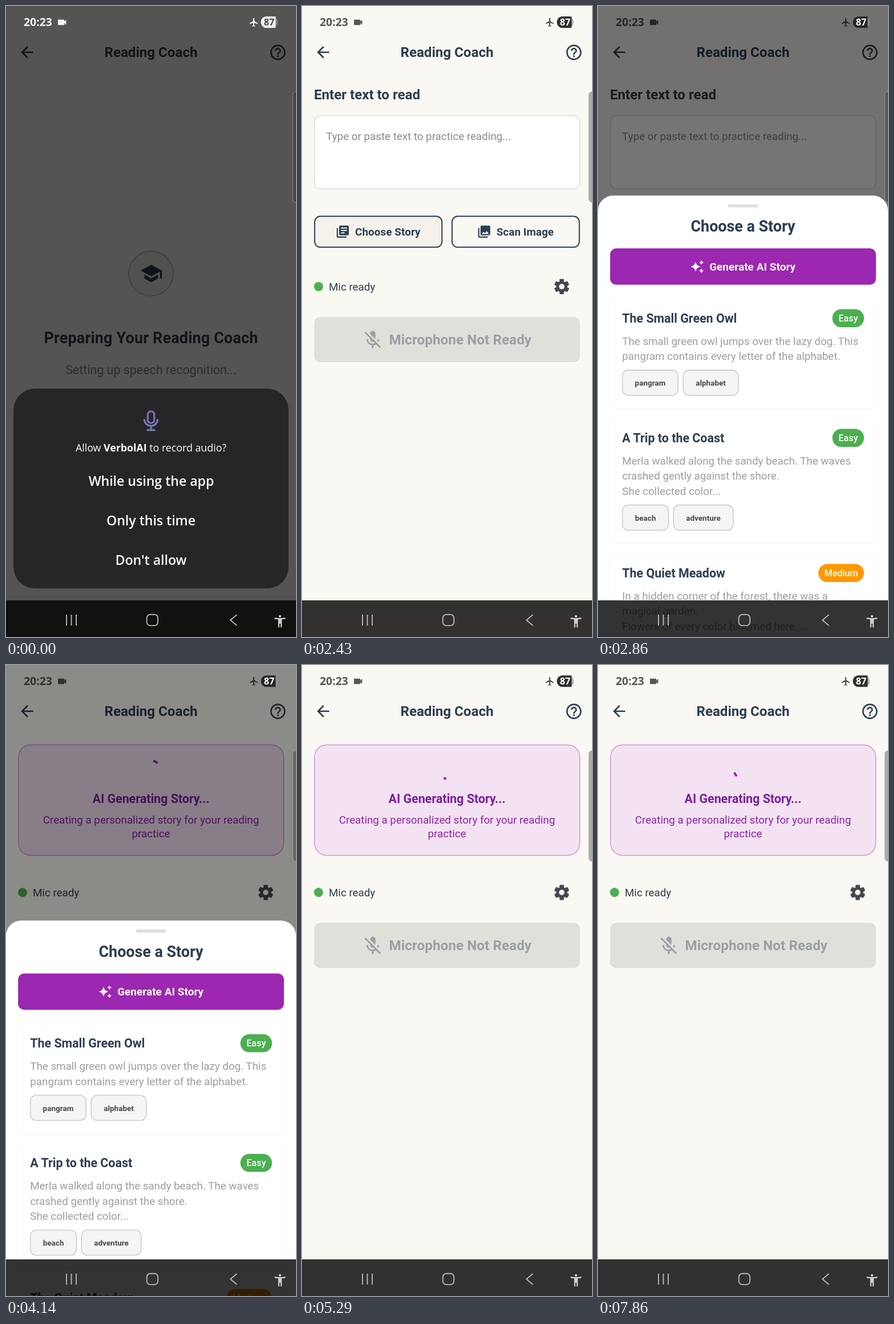
Recreate the animation shown at these times as an HTML page. Size 508 by 1102 pixels, loop 8 s.

```html
<!DOCTYPE html>
<html lang="en">
<head>
<meta charset="utf-8">
<title>Reading practice</title>
<style>
html, body { margin: 0; width: 100%; height: 100%; overflow: hidden; background: #f9f8f2; }
svg { display: block; font-family: Roboto, sans-serif; }
text { white-space: pre; }
.mid { text-anchor: middle; }
.bold { font-weight: 600; }
.navy { fill: #2c3e50; }
.s10 { font-size: 13.4px; letter-spacing: .06px; }
.s12 { font-size: 16.1px; }
.s14 { font-size: 18.76px; }
.s16 { font-size: 21.42px; }
.s18 { font-size: 24.1px; }
.s20 { font-size: 26.85px; }
.label { letter-spacing: .13px; }
.grey { fill: #9e9e9e; }
.card { fill: #fff; filter: drop-shadow(0 1px 2px rgba(0,0,0,.045)); }
.chip { fill: #f5f5f5; stroke: #c8c8cc; stroke-width: 1.4; }
.chipText { fill: #49454f; }
.outline { fill: #f9f8f2; stroke: #2c3e50; stroke-width: 2; }
.outline.pressed { fill: #f5f2eb; }
.system { font-family: "Open Sans", "Noto Sans", sans-serif; }
.choice { font-size: 23.1px; font-weight: 600; }
#status { --ink: rgba(0,0,0,.65); --pill: rgba(0,0,0,.73); --digits: #fff; }
#status.light { --ink: #f4f4f4; --pill: #f0f0f0; --digits: #4a4a48; }
</style>
</head>
<body>
<svg width="508" height="1102" viewBox="0 0 508 1102">
  <defs>
    <linearGradient id="violet" gradientUnits="userSpaceOnUse" x1="254" y1="706" x2="254" y2="742">
      <stop offset="0" stop-color="#8b69b4"/><stop offset="1" stop-color="#6c7cb9"/>
    </linearGradient>
    <rect id="tooth" x="-3.8" y="-13.2" width="7.6" height="7" rx="1.2"/>
  </defs>
  <rect width="508" height="1102" fill="#f9f8f2"/>

  <!-- App bar -->
  <g class="navy">
    <path transform="translate(20.9 64.7) scale(1.34)" d="M20 11H7.83l5.59-5.59L12 4l-8 8 8 8 1.41-1.41L7.83 13H20v-2z"/>
    <text class="mid bold s18" x="254" y="89.3">Reading Coach</text>
    <path transform="translate(460.2 64.9) scale(1.34)" d="M11 18h2v-2h-2v2zm1-16C6.48 2 2 6.48 2 12s4.48 10 10 10 10-4.48 10-10S17.52 2 12 2zm0 18c-4.41 0-8-3.59-8-8s3.59-8 8-8 8 3.59 8 8-3.59 8-8 8zm0-14c-2.21 0-4 1.79-4 4h2c0-1.1.9-2 2-2s2 .9 2 2c0 2-3 1.75-3 5h2c0-2.25 3-2.5 3-5 0-2.21-1.79-4-4-4z"/>
  </g>

  <g id="preparing" class="navy">
    <circle cx="254" cy="467.3" r="39" fill="#eeeee8" stroke="#bfc0bd" stroke-width="2"/>
    <path transform="translate(234 446.8) scale(1.7)" d="M5 13.18v4L12 21l7-3.82v-4L12 17l-7-3.82zM12 3L1 9l11 6 9-4.91V17h2V9L12 3z"/>
    <text class="mid bold s20" x="254" y="589.4" letter-spacing=".22">Preparing Your Reading Coach</text>
    <text class="mid s16" x="254" y="642.5" fill="#7b8288" style="fill:#7b8288">Setting up speech recognition...</text>
  </g>

  <g id="editor">
    <text class="bold s18 navy" x="21" y="162.6">Enter text to read</text>
    <rect x="22" y="191.5" width="464.5" height="127.7" rx="10.5" fill="#fff" stroke="#e3e3de" stroke-width="2"/>
    <text class="s14" x="42.3" y="234.4" fill="#8a8a8a">Type or paste text to practice reading...</text>
    <rect id="choose" class="outline" x="22.2" y="367.3" width="223" height="54" rx="10"/>
    <rect class="outline" x="262.8" y="367.3" width="223" height="54" rx="10"/>
    <g class="navy bold s14 label">
      <path transform="translate(58.7 381.4) scale(1.06)" d="M4 6H2v14c0 1.1.9 2 2 2h14v-2H4V6zm16-4H8c-1.1 0-2 .9-2 2v12c0 1.1.9 2 2 2h12c1.1 0 2-.9 2-2V4c0-1.1-.9-2-2-2zm-1 9H9V9h10v2zm-4 4H9v-2h6v2zm4-8H9V5h10v2z"/>
      <text x="93" y="401">Choose Story</text>
      <path transform="translate(306.4 381.4) scale(1.06)" d="M22 16V4c0-1.1-.9-2-2-2H8c-1.1 0-2 .9-2 2v12c0 1.1.9 2 2 2h12c1.1 0 2-.9 2-2zm-11-4l2.03 2.71L16 11l4 5H8l3-4zM2 6v14c0 1.1.9 2 2 2h14v-2H4V6H2z"/>
      <text x="340.7" y="401">Scan Image</text>
    </g>
  </g>

  <g id="generating">
    <rect x="22" y="139.5" width="464.5" height="193" rx="21" fill="#f3e2f2" stroke="#ce93d8" stroke-width="1.4"/>
    <path id="spinner" fill="none" stroke="#9c27b0" stroke-width="4" stroke-linecap="square"/>
    <text class="mid bold s16" x="254" y="241" fill="#7b1fa2">AI Generating Story...</text>
    <g class="mid s14" fill="#8e24aa">
      <text x="254" y="276.6">Creating a personalized story for your reading</text>
      <text x="254" y="300.6">practice</text>
    </g>
  </g>

  <g id="micRow">
    <circle cx="29" cy="490" r="8" fill="#4caf50"/>
    <text class="s14 navy" x="47" y="496.7">Mic ready</text>
    <g transform="translate(455 490)" fill="#444850">
      <circle r="7.3" fill="none" stroke="#444850" stroke-width="5"/>
      <use href="#tooth"/><use href="#tooth" transform="rotate(60)"/><use href="#tooth" transform="rotate(120)"/>
      <use href="#tooth" transform="rotate(180)"/><use href="#tooth" transform="rotate(240)"/><use href="#tooth" transform="rotate(300)"/>
    </g>
    <rect x="21.2" y="543" width="465.7" height="79" rx="10.5" fill="#dfe0da"/>
    <g fill="#9b9fa6">
      <path transform="translate(104.9 564.2) scale(1.59)" d="M19 11h-1.7c0 .74-.16 1.43-.43 2.05l1.23 1.23c.56-.98.9-2.09.9-3.28zm-4.02.17c0-.06.02-.11.02-.17V5c0-1.66-1.34-3-3-3S9 3.34 9 5v.18l5.98 5.99zM4.27 3L3 4.27l6.01 6.01V11c0 1.66 1.33 3 2.99 3 .22 0 .44-.03.65-.08l1.66 1.66c-.71.33-1.5.52-2.31.52-2.76 0-5.3-2.1-5.3-5.1H5c0 3.41 2.72 6.23 6 6.72V21h2v-3.28c.91-.13 1.77-.45 2.54-.9L19.73 21 21 19.73 4.27 3z"/>
      <text class="bold s18" x="152.6" y="591.2" letter-spacing=".12">Microphone Not Ready</text>
    </g>
  </g>

  <rect id="barrier" width="508" height="1102"/>

  <g id="sheet">
    <path d="M0 1110V357.5a26.5 26.5 0 0 1 26.5-26.5h455a26.5 26.5 0 0 1 26.5 26.5V1110z" fill="#fff"/>
    <rect x="227.5" y="346.5" width="53" height="5.3" rx="2.65" fill="#dfdfdf"/>
    <text class="mid bold s20 navy" x="254" y="394.3">Choose a Story</text>
    <rect x="21.2" y="423.3" width="465.7" height="63.5" rx="10.5" fill="#9c27b0"/>
    <g fill="#fff">
      <path transform="translate(161.6 442.8) scale(1.03)" d="M19 9l1.25-2.75L23 5l-2.75-1.25L19 1l-1.25 2.75L15 5l2.75 1.25L19 9zm-7.5.5L9 4 6.5 9.5 1 12l5.5 2.5L9 20l2.5-5.5L17 12l-5.5-2.5zM19 15l-1.25 2.75L15 19l2.75 1.25L19 23l1.25-2.75L23 19l-2.75-1.25L19 15z"/>
      <text class="bold s14 label" x="195.2" y="461.6">Generate AI Story</text>
    </g>
    <g id="stories"></g>
  </g>

  <rect y="1038" width="508" height="64" fill="#000" opacity=".8"/>
  <rect id="dim" width="508" height="1102"/>

  <g id="dialog" class="system" fill="#fafafa">
    <rect x="13.2" y="668.3" width="481.6" height="348.7" rx="37" fill="#262628"/>
    <g fill="none" stroke="url(#violet)" stroke-width="3.2">
      <rect x="248.3" y="707.8" width="11.4" height="20.6" rx="5.7"/>
      <path d="M242.3 721.5a11.7 11.9 0 0 0 23.4 0M254 733v7M246.5 740.7h15"/>
    </g>
    <text class="mid" x="254" y="778.4" font-size="17.8">Allow <tspan font-weight="700">VerbolAI</tspan> to record audio?</text>
    <g class="mid choice">
      <text x="254.5" y="838">While using the app</text>
      <text x="254" y="907">Only this time</text>
      <text x="254" y="975.6">Don't allow</text>
    </g>
  </g>

  <!-- Edge panel handle -->
  <rect x="502.5" y="149.5" width="20" height="193.5" rx="6" fill="rgba(45,45,45,.38)" stroke="rgba(165,165,165,.75)"/>

  <g id="status" class="system" font-weight="700">
    <g fill="var(--ink)">
      <text x="31" y="35.2" font-size="19.4">20:23</text>
      <path transform="translate(88.6 18.9) scale(.8)" d="M17 10.5V7c0-.55-.45-1-1-1H4c-.55 0-1 .45-1 1v10c0 .55.45 1 1 1h12c.55 0 1-.45 1-1v-3.5l4 4v-11l-4 4z"/>
      <path transform="translate(425.3 19.4) scale(.75)" d="M21 16v-2l-8-5V3.5c0-.83-.67-1.5-1.5-1.5S10 2.67 10 3.5V9l-8 5v2l8-2.5V19l-2 1.5V22l3.5-1 3.5 1v-1.5L13 19v-5.5l8 2.5z"/>
    </g>
    <rect x="446.5" y="18.3" width="29.5" height="20" rx="9.5" fill="#999" opacity=".7"/>
    <path d="M456 18.3h16.3v20H456a9.5 9.5 0 0 1-9.5-9.5v-1a9.5 9.5 0 0 1 9.5-9.5z" fill="var(--pill)"/>
    <text class="mid" x="461" y="34.2" font-size="16.2" fill="var(--digits)">87</text>
  </g>

  <!-- Navigation buttons -->
  <g fill="none" stroke="#b6b6b4" stroke-width="1.9">
    <path d="M106 1063v19M114.5 1063v19M123 1063v19"/>
    <rect x="246.7" y="1062.7" width="19.4" height="19.4" rx="6"/>
    <path d="M404.5 1063l-11.3 9.5 11.3 9.5"/>
  </g>
  <path fill="#d0d0ce" transform="translate(467 1061.5) scale(1.08)" d="M20.5 6c-2.61.7-5.67 1-8.5 1s-5.89-.3-8.5-1L3 8c1.86.5 4 .83 6 1v13h2v-6h2v6h2V9c2-.17 4.14-.5 6-1l-.5-2zM12 6c1.1 0 2-.9 2-2s-.9-2-2-2-2 .9-2 2 .9 2 2 2z"/>
</svg>
<script>
const LOOP = 8000, FPS = 7;
const READY = 400, PRESS = 2420, OPEN = 2540, CLOSE = 4046;
const $ = id => document.getElementById(id);
const clamp = x => Math.min(1, Math.max(0, x));
const ramp = (t, start, length) => clamp((t - start) / length);
const show = (id, on) => $(id).setAttribute('visibility', on ? 'visible' : 'hidden');

function bezier(x1, y1, x2, y2) {
  const at = (a, b, s) => 3 * a * s * (1 - s) ** 2 + 3 * b * s * s * (1 - s) + s ** 3;
  return x => {
    if (x <= 0 || x >= 1) return clamp(x);
    let lo = 0, hi = 1;
    for (let i = 0; i < 24; i++) {
      const s = (lo + hi) / 2;
      if (at(x1, x2, s) < x) lo = s; else hi = s;
    }
    return at(y1, y2, lo);
  };
}
const fastOutSlowIn = bezier(.4, 0, .2, 1);
const decelerate = bezier(0, 0, .2, 1);
const ease = bezier(.25, .1, .25, 1);

// chips: [label, left, width]
const stories = [
  { y: 513, h: 189, title: 'The Small Green Owl', level: 'Easy', lines: [
    'The small green owl jumps over the lazy dog. This',
    'pangram contains every letter of the alphabet.'],
    chips: [['pangram', 42.7, 97.5], ['alphabet', 149.3, 96.5]] },
  { y: 722, h: 215.5, title: 'A Trip to the Coast', level: 'Easy', lines: [
    'Merla walked along the sandy beach. The waves',
    'crashed gently against the shore.',
    'She collected color...'],
    chips: [['beach', 42.7, 80.8], ['adventure', 132.3, 104.5]] },
  { y: 958, h: 215.5, title: 'The Quiet Meadow', level: 'Medium', lines: [
    'In a hidden corner of the forest, there was a',
    'magical garden.',
    'Flowers of every color bloomed here, ...'],
    chips: [] }
];

function storyCard({ y, h, title, level, lines, chips }) {
  const easy = level === 'Easy', width = easy ? 55.5 : 80;
  const chipY = y + 70 + lines.length * 26.5;
  return `<rect class="card" x="21.2" y="${y}" width="465.7" height="${h}" rx="10.5"/>
    <text class="bold s16 navy" x="42.3" y="${y + 39.7}">${title}</text>
    <rect x="${466 - width}" y="${y + 16.5}" width="${width}" height="31.5" rx="15.75" fill="${easy ? '#4caf50' : '#ff9800'}"/>
    <text class="mid s12" x="${466 - width / 2}" y="${y + 37.9}" fill="#fff" font-weight="500">${level}</text>` +
    lines.map((line, i) => `<text class="s14 grey" x="42.3" y="${y + 78.7 + i * 26.5}">${line}</text>`).join('') +
    chips.map(([label, x, w]) => `<rect class="chip" x="${x}" y="${chipY}" width="${w}" height="44" rx="10.5"/>
      <text class="mid bold s10 chipText" x="${x + w / 2}" y="${chipY + 27.2}">${label}</text>`).join('');
}
$('stories').innerHTML = stories.map(storyCard).join('');

function spinnerPath(ms) {
  const turns = ms / 1333, cycle = turns % 1;
  const head = fastOutSlowIn(clamp(cycle * 2));
  const tail = fastOutSlowIn(clamp(cycle * 2 - 1));
  const start = Math.PI * (-.5 + tail * 1.5 + ms / 2222 * 2 + cycle * .5);
  const sweep = Math.max((head - tail) * 1.5 * Math.PI, .001);
  const point = a => `${254 + 15.9 * Math.cos(a)} ${182.6 + 15.9 * Math.sin(a)}`;
  return `M${point(start)}A15.9 15.9 0 ${sweep > Math.PI ? 1 : 0} 1 ${point(start + sweep)}`;
}

function draw(t) {
  const asking = 1 - ramp(t, 100, 200);
  const busy = t >= CLOSE, ready = t >= READY;
  const sheet = busy ? 1 - ramp(t, CLOSE, 200) : ramp(t, OPEN, 250);

  show('preparing', !ready);
  show('editor', ready && !busy);
  show('generating', busy);
  show('micRow', ready);
  $('micRow').setAttribute('transform', `translate(0 ${busy ? -92.8 : 0})`);
  $('choose').classList.toggle('pressed', t >= PRESS);

  show('sheet', sheet > 0);
  $('sheet').setAttribute('transform', `translate(0 ${771 * (1 - decelerate(sheet))})`);
  $('barrier').setAttribute('opacity', .54 * ease(sheet));

  $('dim').setAttribute('opacity', .66 * asking);
  $('dialog').setAttribute('opacity', asking * asking);
  $('status').classList.toggle('light', asking > .5);

  if (busy) $('spinner').setAttribute('d', spinnerPath(t - CLOSE));
}

function tick() {
  const t = performance.now() % LOOP;
  const step = Math.min(Math.floor((t + 3) * FPS / 1000), LOOP * FPS / 1000 - 1);
  draw(step * 1000 / FPS);
  requestAnimationFrame(tick);
}
tick();
</script>
</body>
</html>
```
